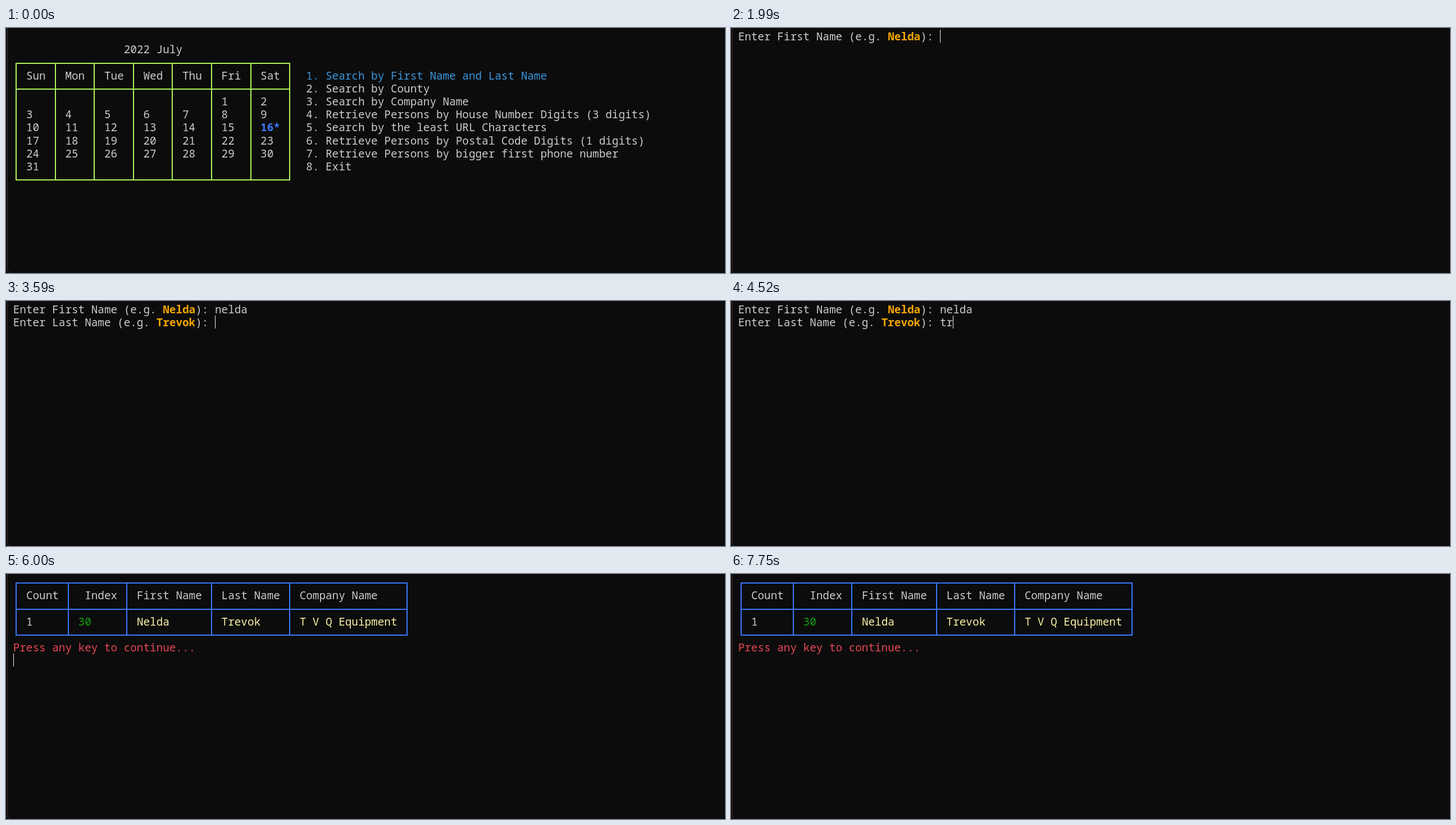
An HTML page for the animation above (8 s loop, 1280 by 437 pixels).

```html
<!DOCTYPE html>
<html lang="en">
<head>
<meta charset="utf-8">
<title>Terminal search</title>
<style>
  html, body { margin: 0; width: 100%; height: 100%; overflow: hidden; background: #0c0c0c; }
  svg { display: block; width: 100%; height: 100%; }
  text { font: 500 19.32px "Noto Sans Mono", "DejaVu Sans Mono", monospace; fill: #ccc; }
  .strong { font-weight: 600; }
</style>
</head>
<body>
<svg id="stage" viewBox="0 0 1280 437"></svg>
<script>
const LOOP = 8000;
const X0 = 13, Y0 = 3, CELL_W = 11.59, CELL_H = 23.2, ASCENT = 18.9;
const GREY = '#ccc', BLUE = '#3b78ff', CYAN = '#3a96dd', LIME = '#b0f55c', ORANGE = '#f5a700',
      YELLOW = '#f9f1a5', GREEN = '#13a10e', RED = '#e74856';
const FIRST = 'Nelda', LAST = 'Trevok';
const FIRST_KEYS = [2850, 3000, 3200, 3330, 3460];
const LAST_KEYS = [4190, 4520, 4720, 4980, 5250, 5470];
const PROMPT_AT = 1990, SECOND_AT = 3590, RESULT_AT = 6000;

const stage = document.getElementById('stage');

function add(parent, tag, attrs = {}) {
  const el = document.createElementNS('http://www.w3.org/2000/svg', tag);
  for (const key in attrs) el.setAttribute(key, attrs[key]);
  return parent.appendChild(el);
}

// Places text on the terminal grid.
function put(parent, col, row, str, color = GREY, strong = false) {
  const el = add(parent, 'text', {
    x: X0 - 0.3 + col * CELL_W,
    y: Y0 + ASCENT + row * CELL_H,
    style: `fill:${color}`,
    class: strong ? 'strong' : ''
  });
  el.textContent = str;
  return el;
}

// Rules run through the middle of their cells.
function grid(parent, cols, rows, color) {
  const xs = cols.map(c => Math.floor(X0 + (c + 0.5) * CELL_W));
  const ys = rows.map(r => Math.round(16.2 + r * CELL_H));
  const left = xs[0], right = xs[xs.length - 1];
  const top = ys[0], bottom = ys[ys.length - 1];
  const d = xs.map(x => `M${x} ${top}V${bottom}`).join('') +
            ys.map(y => `M${left} ${y}H${right}`).join('');
  add(parent, 'path', { d, stroke: color, 'stroke-width': 2, 'stroke-linecap': 'square', fill: 'none' });
}

function buildMenu() {
  const g = add(stage, 'g');
  put(g, 17, 1, '2022 July');
  grid(g, [0, 6, 12, 18, 24, 30, 36, 42], [2, 4, 11], LIME);
  ['Sun', 'Mon', 'Tue', 'Wed', 'Thu', 'Fri', 'Sat'].forEach((day, i) => put(g, 2 + 6 * i, 3, day));
  for (let day = 1; day <= 31; day++) {
    const slot = day + 4, today = day === 16;
    put(g, 2 + 6 * (slot % 7), 5 + Math.floor(slot / 7),
        today ? day + '*' : day, today ? BLUE : GREY, today);
  }
  [
    'Search by First Name and Last Name',
    'Search by County',
    'Search by Company Name',
    'Retrieve Persons by House Number Digits (3 digits)',
    'Search by the least URL Characters',
    'Retrieve Persons by Postal Code Digits (1 digits)',
    'Retrieve Persons by bigger first phone number',
    'Exit'
  ].forEach((item, i) => put(g, 45, 3 + i, `${i + 1}. ${item}`, i ? GREY : CYAN));
  return g;
}

function buildPrompt(row, label, example) {
  const g = add(stage, 'g');
  const lead = `Enter ${label} Name (e.g. `;
  put(g, 0, row, lead);
  put(g, lead.length, row, example, ORANGE, true);
  put(g, lead.length + example.length, row, '):');
  return { g, input: put(g, 31, row, '') };
}

function buildResult() {
  const g = add(stage, 'g');
  grid(g, [0, 8, 17, 30, 42, 60], [0, 2, 4], BLUE);
  put(g, 2, 1, 'Count');
  put(g, 11, 1, 'Index');
  put(g, 19, 1, 'First Name');
  put(g, 32, 1, 'Last Name');
  put(g, 44, 1, 'Company Name');
  put(g, 2, 3, '1');
  put(g, 10, 3, '30', GREEN);
  put(g, 19, 3, FIRST, YELLOW);
  put(g, 32, 3, LAST, YELLOW);
  put(g, 44, 3, 'T V Q Equipment', YELLOW);
  put(g, 0, 5, 'Press any key to continue...', RED);
  return g;
}

add(stage, 'rect', { width: 1280, height: 437, fill: '#0c0c0c' });
const edge = add(stage, 'path', { d: 'M2.5 0V428Q2.5 434 5 437', fill: 'none' });
const menu = buildMenu();
const first = buildPrompt(0, 'First', FIRST);
const second = buildPrompt(1, 'Last', LAST);
const result = buildResult();
const cursor = add(stage, 'rect', { width: 1, height: 23, fill: '#f2f2f2' });

const show = (el, on) => el.setAttribute('visibility', on ? 'visible' : 'hidden');
const typed = (keys, t) => keys.filter(k => k <= t).length;
const within = (t, from, to) => t >= from && t < to;

function render(t) {
  const asking = within(t, PROMPT_AT, RESULT_AT);
  const onSecond = t >= SECOND_AT, done = t >= RESULT_AT;
  const n1 = typed(FIRST_KEYS, t), n2 = typed(LAST_KEYS, t);

  edge.setAttribute('stroke', t < 590 ? '#3a3a3a' : '#4a2a20');
  show(menu, t < PROMPT_AT);
  show(first.g, asking);
  show(second.g, asking && onSecond);
  show(result, done);
  first.input.textContent = FIRST.toLowerCase().slice(0, n1);
  second.input.textContent = LAST.toLowerCase().slice(0, n2);

  const col = done ? 0 : 31 + (onSecond ? n2 : n1);
  const row = done ? 6 : onSecond ? 1 : 0;
  const blinkedOff = within(t, 2580, 2850) || within(t, 6600, 7200) || t >= 7750;
  cursor.setAttribute('x', Math.floor(X0 + col * CELL_W));
  cursor.setAttribute('y', Math.floor(Y0 + row * CELL_H));
  show(cursor, t >= PROMPT_AT && !blinkedOff);
}

const start = performance.now();
function tick() {
  render((performance.now() - start) % LOOP);
  requestAnimationFrame(tick);
}
tick();
</script>
</body>
</html>
```
